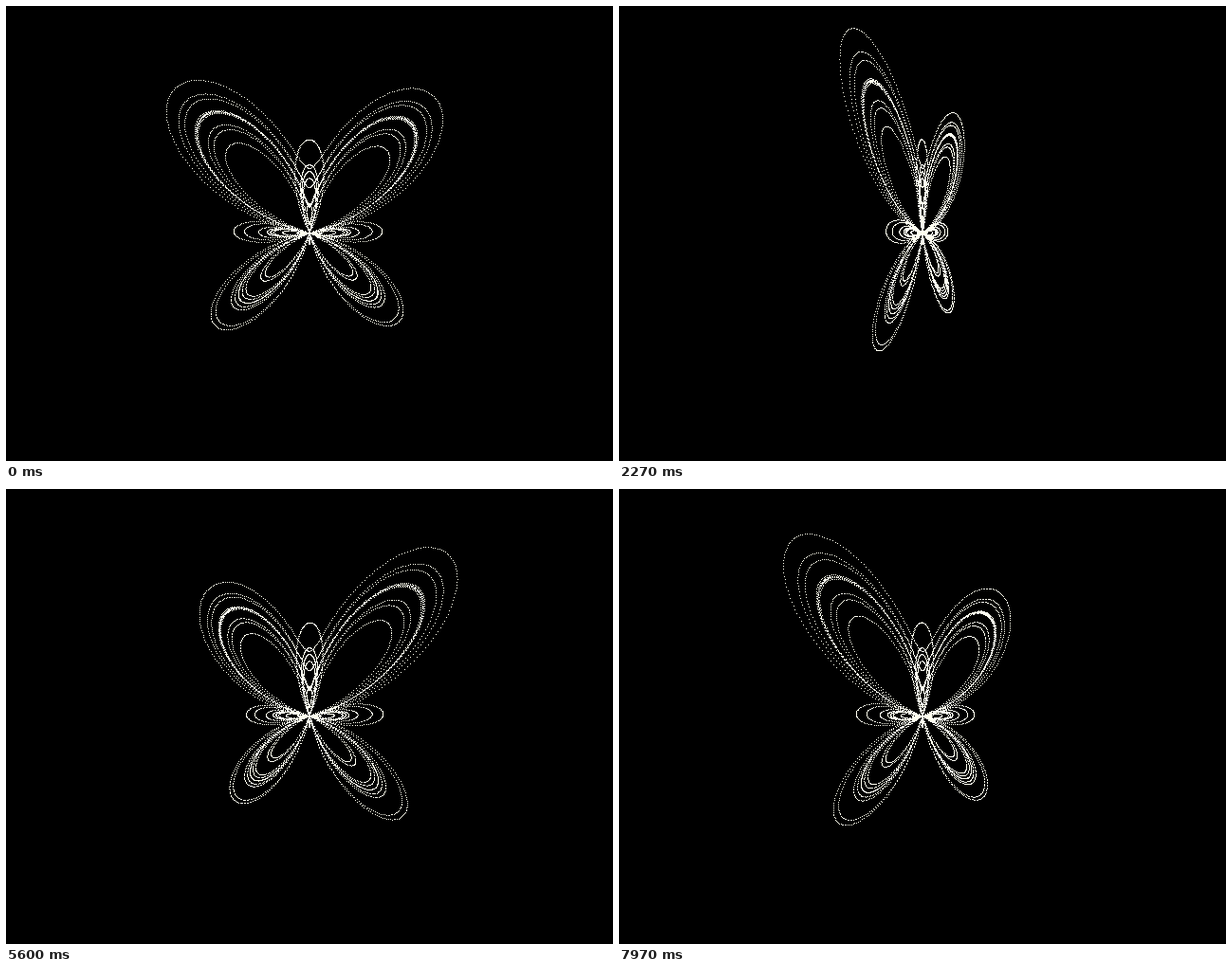
An HTML page with a canvas that plays this animation: 640x480 px, repeating every 8 s.

```html
<!DOCTYPE html>
<html lang="en">
<head>
<meta charset="utf-8">
<title>Rotating butterfly curve</title>
<style>
  html, body { margin: 0; width: 100%; height: 100%; overflow: hidden; background: #000; }
  canvas { display: block; width: 640px; height: 480px; image-rendering: pixelated; }
</style>
</head>
<body>
<canvas id="stage" width="640" height="480"></canvas>
<script>
const ctx = document.getElementById('stage').getContext('2d');
const WIDTH = 640, HEIGHT = 480;
const LOOP_MS = 8000, STEP_MS = 100 / 3;
const SCALE = 40, CAMERA = 410, DT = 0.01;
const START_DEG = 5.7, DEG_PER_STEP = 0.892;
const { sin, cos, exp, PI, floor } = Math;

// Fay's butterfly curve, sampled evenly in its parameter
const points = [];
for (let t = 0; t < 24 * PI; t += DT) {
  const r = SCALE * (exp(cos(t)) - 2 * cos(4 * t) - sin(t / 12) ** 5);
  points.push([r * sin(t), r * cos(t)]);
}

function draw(step) {
  const angle = (START_DEG + DEG_PER_STEP * step) * PI / 180;
  const c = cos(angle), s = sin(angle);
  ctx.fillStyle = '#000';
  ctx.fillRect(0, 0, WIDTH, HEIGHT);
  ctx.fillStyle = '#fffff0';
  for (const [x, y] of points) {
    const k = CAMERA / (CAMERA + x * s);
    ctx.fillRect(floor(WIDTH / 2 + x * c * k), floor(HEIGHT / 2 - y * k), 1, 1);
  }
}

const origin = performance.now();
let shown = -1;

function tick() {
  const ms = (performance.now() - origin) % LOOP_MS;
  // Step starts fall on the nearest 10 ms
  const step = floor((floor(ms / 10) * 10 + 4) / STEP_MS);
  if (step !== shown) draw(shown = step);
  requestAnimationFrame(tick);
}
tick();
</script>
</body>
</html>
```
